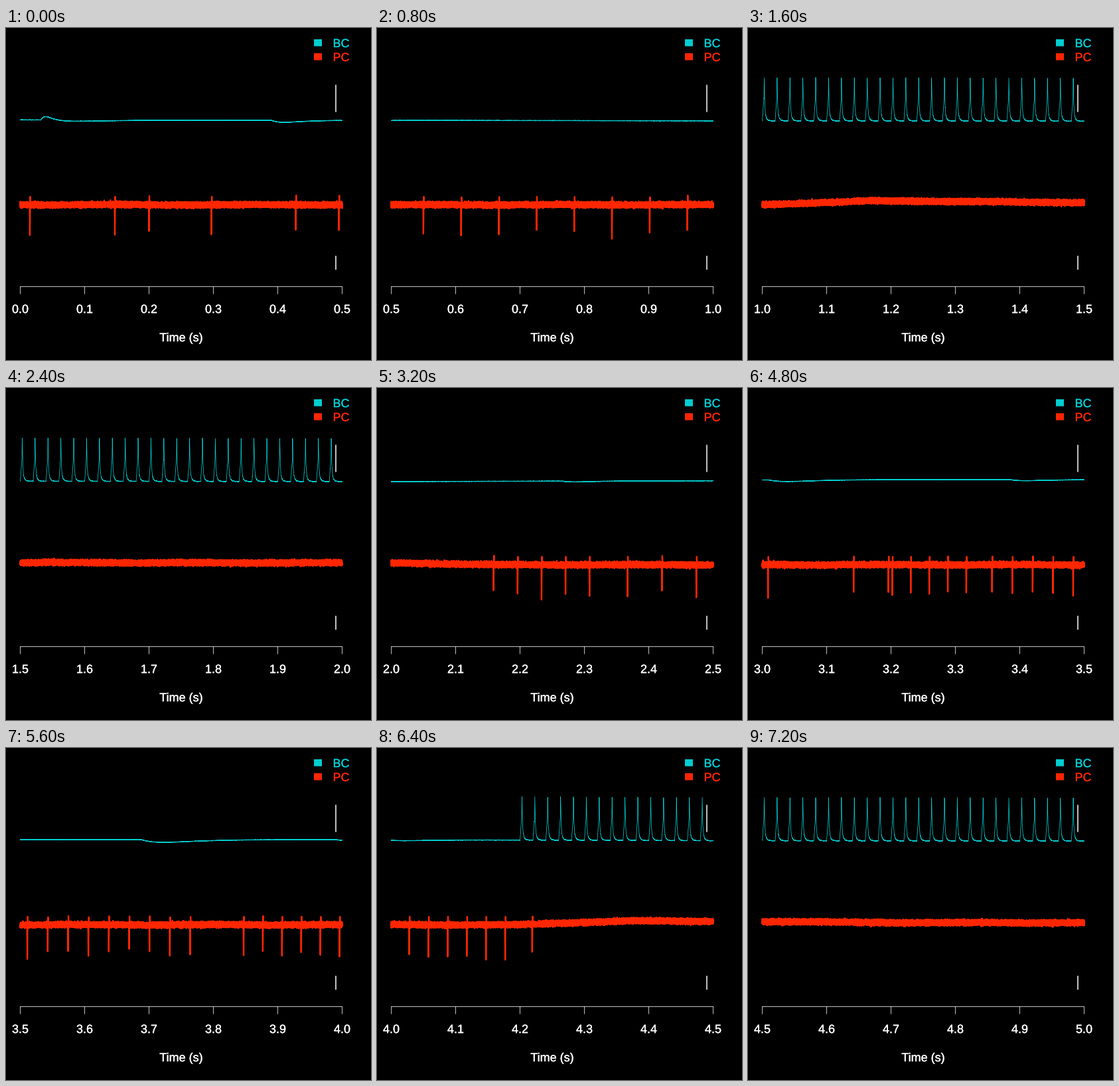
Write a matplotlib script that moves like this. It is 550 px wide and 500 px high and loops after 8 s.

```python
import numpy as np
import matplotlib.pyplot as plt
from matplotlib.animation import FuncAnimation
from matplotlib.patches import Rectangle
from matplotlib.patheffects import withStroke

plt.rcParams["text.hinting"] = "none"

W, H = 550, 500
LEFT, RIGHT = 21.5, 506.5
WINDOWS = 10             # of 0.5 s each
RATE = 20                # samples per ms
SPAN = 500 * RATE        # samples per window
CYAN, RED, WHITE = "#00cdd0", "#ff2600", "#ffffff"
PT = 0.72                # points per pixel at 100 dpi

TRAINS = [1.0, 4.2]      # onsets of the 50 Hz BC trains, each 1 s long

# Regular PC firing: first spike, last spike (s), number of spikes
BOUTS = [(0.015, 0.147, 2), (0.2, 0.297, 2), (0.428, 0.495, 2),
         (0.55, 0.96, 8), (2.159, 2.308, 5), (2.367, 2.474, 3),
         (2.53, 3.009, 12), (3.142, 3.196, 2), (3.202, 3.317, 5),
         (3.357, 3.483, 5), (3.511, 3.764, 9), (3.847, 3.996, 6),
         (4.028, 4.177, 6), (4.219, 4.219, 1)]

# Brief dips of BC: onset (s), size (px), time constant (s)
DIPS = [(0.032, -5, 0.008), (0.04, 2, 0.04), (0.39, 3, 0.02),
        (2.265, 1.2, 0.02), (3.01, 2.4, 0.03), (3.385, 1.6, 0.025),
        (3.688, 4, 0.035), (3.99, 1.5, 0.03)]

rng = np.random.default_rng(20)
n = np.arange(WINDOWS * SPAN)
t = n / RATE / 1000
x = np.linspace(LEFT, RIGHT, SPAN)


def curve(pos, knots):
    px, py = zip(*knots)
    return np.interp(pos, px, py)


def bc_trace():
    y = curve(t, [(0, 138.4), (1, 139.8), (2, 140.9), (2.5, 139.7),
                  (3.2, 138), (4, 138), (4.5, 139.6), (5, 140.2)])
    for start, size, tau in DIPS:
        u = np.maximum(t - start, 0) / tau
        y += size * u * np.exp(1 - u)
    ms = (n % (20 * RATE)) / RATE
    spike = curve(ms, [(0, 0), (1.5, 20), (2.6, 34), (3, 65), (3.4, 45),
                       (3.9, 24), (5, 10), (6.5, 4), (9, 1), (14, 0)])
    for start in TRAINS:
        since = n - round(start * 1000 * RATE)
        y -= np.where((since >= 0) & (since < 1000 * RATE), spike, 0)
    return y + rng.normal(0, 0.22, n.size)


def pc_trace():
    y = 266.2 + 0.3 * np.sin(31 * t)
    for start in TRAINS:
        y -= curve(t - start, [(0, 0), (0.17, 6), (0.5, 3.2), (1, 2.8),
                               (1.17, 0)])
    y += rng.uniform(-4, 4, n.size) + rng.normal(0, 0.8, n.size)
    for first, last, count in BOUTS:
        for at in np.linspace(first, last, count):
            low = rng.uniform(305, 320)
            high = 253 - max(0, 309 - low) / 2
            near = np.abs(t - at) < 0.001
            rest = y[near].mean()
            y[near] = curve((t[near] - at) * 1000,
                            [(-0.5, rest), (-0.1, low - 1),
                             (0.5, high + 1), (0.9, rest)])
    return y


bc, pc = bc_trace(), pc_trace()

fig = plt.figure(figsize=(W / 100, H / 100), dpi=100, facecolor="black")
ax = fig.add_axes([0, 0, 1, 1])
ax.set_xlim(0, W)
ax.set_ylim(H, 0)
ax.axis("off")


def line(xs, ys, color=WHITE, width=0.75, cap="round"):
    return ax.plot(xs, ys, color=color, lw=width * PT, snap=False,
                   solid_capstyle=cap, solid_joinstyle="round")[0]


def label(px, py, text, color=WHITE, align="center"):
    # a hairline stroke gives the slightly heavier screen weight
    return ax.text(px, py, text, color=color, ha=align, va="baseline",
                   family="Liberation Sans", size=18 * PT,
                   path_effects=[withStroke(linewidth=0.3 * PT,
                                            foreground=color)])


for name, color, top in (("BC", CYAN, 17), ("PC", RED, 38)):
    ax.add_patch(Rectangle((464, top), 12, 10.5, fc=color, lw=0, snap=False))
    label(492.5, top + 12, name, color, "left")

bc_line = line(x, bc[:SPAN], CYAN)
pc_line = line(x, pc[:SPAN], RED, 2.25)

for top, bottom in ((85.5, 126.5), (343, 364)):
    line([497, 497], [top, bottom], width=1.5, cap="butt")

line([LEFT, RIGHT], [389.5, 389.5])
ticks = np.linspace(LEFT, RIGHT, 6)
for tx in ticks:
    line([tx, tx], [389.5, 400.5])
tick_labels = [label(tx, 429.2, "") for tx in ticks]
label(264, 472, "Time (s)")


def update(win):
    part = slice(win * SPAN, (win + 1) * SPAN)
    bc_line.set_ydata(bc[part])
    pc_line.set_ydata(pc[part])
    for k, txt in enumerate(tick_labels):
        txt.set_text(f"{win / 2 + k / 10:.1f}")
    return [bc_line, pc_line, *tick_labels]


anim = FuncAnimation(fig, update, frames=WINDOWS, interval=800, repeat=True)
plt.show()
```
